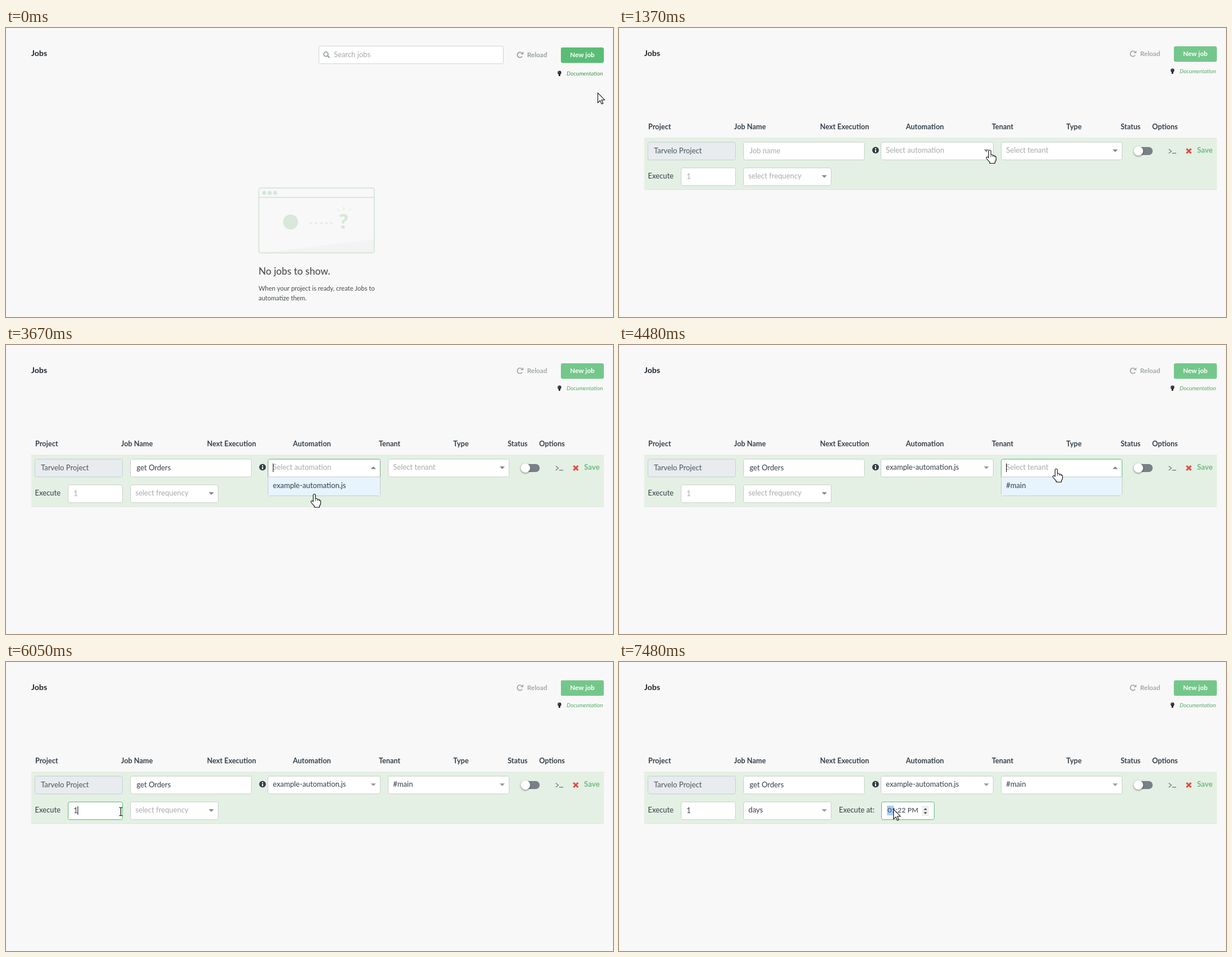
Recreate the animation shown at these times as an HTML page with a canvas. Size 1060 px wide and 505 px high, loop 8000 ms.

```html
<!DOCTYPE html>
<html lang="en">
<head>
<meta charset="utf-8">
<title>Jobs</title>
<style>
  html, body { margin: 0; width: 100%; height: 100%; overflow: hidden; background: #f8f8f8; }
  canvas { display: block; width: 1060px; height: 505px; }
</style>
</head>
<body>
<canvas id="stage" width="1060" height="505"></canvas>
<script>
const ctx = document.getElementById('stage').getContext('2d');
const LOOP = 8000;
const FONT = 'Lato, "Open Sans", sans-serif';
const INK = '#333d47', MUTED = '#a6aaa7', GREEN = '#5bbd75', PALE = '#d7e7d9', LINE = '#c9d0cd';

// Bursts of activity: first update, last update, number of updates
const BURSTS = [
  [0, 0, 1], [70, 200, 3], [830, 1620, 11], [1710, 1710, 1], [1950, 2140, 4],
  [2320, 2320, 1], [2480, 2480, 1], [2720, 2780, 2], [2950, 3670, 10],
  [3900, 4700, 11], [4790, 4850, 2], [5010, 5570, 8], [5710, 6500, 12],
  [6580, 6760, 3], [6970, 7480, 8]
];

// Pointer path: time, x, y
const PATH = [
  [0, 1033, 113], [200, 1004, 45], [980, 1004, 45], [1383, 647, 213],
  [1620, 378, 212], [1710, 318, 208], [3110, 318, 208], [3430, 545, 215],
  [3510, 545, 218], [3670, 538, 260], [3900, 538, 260], [4380, 762, 214],
  [4540, 764, 218], [4700, 764, 232], [4850, 760, 239], [5010, 760, 239],
  [5330, 153, 241], [5570, 140, 260], [5854, 140, 260], [6213, 290, 262],
  [6284, 292, 264], [6500, 298, 328], [6760, 302, 347], [7040, 302, 347],
  [7410, 479, 257], [LOOP, 479, 257]
];

const TYPED = 'get Orders';
const KEYS = [2000, 2070, 2130, 2310, 2470, 2710, 2770, 2940, 3020, 3100];

const PROJECT = [50, 199, 154, 32], NAME = [217, 199, 212, 32], AUTO = [457, 199, 197, 32],
  TENANT = [667, 199, 212, 32], COUNT = [108, 244, 96, 32], FREQ = [217, 244, 154, 32],
  TIME = [458, 244, 93, 32], BUTTON = [969, 34, 75, 27];

const HAND = new Path2D('M-2 2Q-2 0 0 0Q2 0 2 2V8Q4 7 6 9.5Q8 8.5 9 11Q11 10.5 11 13V17Q10.500 19 9 20.500V23H0V21Q-3 18 -6 14Q-6 11 -3 12L-2 13Z');
const ARROW = new Path2D('M0 0V17L4 13.300L6.700 19.300L9.200 18.200L6.600 12.300L12 12.200Z');

function snap(t) {
  const [a, b, n] = BURSTS.filter(s => s[0] <= t + 1).pop();
  if (n === 1) return a;
  const d = (b - a) / (n - 1);
  const i = Math.floor((t - a + 15) / d);
  return a + d * Math.min(n - 1, Math.max(0, i));
}

function pointer(t) {
  const i = Math.max(1, PATH.findIndex(p => p[0] >= t));
  const [t0, x0, y0] = PATH[i - 1], [t1, x1, y1] = PATH[i];
  const k = (t - t0) / (t1 - t0);
  return [x0 + (x1 - x0) * k, y0 + (y1 - y0) * k];
}

const during = (t, a, b) => t >= a && t < b;
const inside = ([px, py], [x, y, w, h]) => px >= x && px <= x + w && py >= y && py <= y + h;

function text(s, x, y, color = INK, size = 12.8, style = '') {
  ctx.font = `${style} ${size}px ${FONT}`;
  ctx.fillStyle = color;
  ctx.fillText(s, x, y);
}

const bold = (s, x, y, color = INK, size = 12.5) => text(s, x, y, color, size, 'bold');

function rect(x, y, w, h, color) {
  ctx.fillStyle = color;
  ctx.fillRect(x, y, w, h);
}

function dot(x, y, r, color) {
  ctx.fillStyle = color;
  ctx.beginPath();
  ctx.arc(x, y, r, 0, Math.PI * 2);
  ctx.fill();
}

function poly(points, color, fill, width = 1) {
  ctx.beginPath();
  points.forEach(p => ctx.lineTo(...p));
  if (fill) {
    ctx.fillStyle = color;
    ctx.fill();
  } else {
    ctx.strokeStyle = color;
    ctx.lineWidth = width;
    ctx.stroke();
  }
}

function box([x, y, w, h], border = LINE, fill = '#fff', radii = 3) {
  ctx.beginPath();
  ctx.roundRect(x + 0.5, y + 0.5, w - 1, h - 1, radii);
  ctx.fillStyle = fill;
  ctx.fill();
  ctx.strokeStyle = border;
  ctx.lineWidth = 1;
  ctx.stroke();
}

function triangle(x, y, half, up, color) {
  const h = up ? -half : half;
  poly([[x - half, y - h / 2], [x + half, y - h / 2], [x, y + h / 2]], color, true);
}

const caret = (x, y) => rect(x, y, 1, 15, '#111');

function select(area, label, { value, open, focus, blink = true, border = GREEN }) {
  const [x, y, w, h] = area;
  if (focus) {
    ctx.fillStyle = 'rgba(0,126,255,.12)';
    ctx.beginPath();
    ctx.roundRect(x - 2, y - 2, w + 4, h + 4, 5);
    ctx.fill();
  }
  box(area, open || focus ? border : LINE, '#fff', open ? [3, 3, 0, 0] : 3);
  text(value || label, x + 9, y + 19, value ? INK : MUTED);
  triangle(x + w - 12.5, y + 15.5, 4.5, open, value ? '#999' : '#808582');
  if (open && blink) caret(x + 9, y + 8);
}

function menu([x, y, w, h], items, active) {
  const top = y + h, rows = items.length;
  box([x, top - 1, w, rows * 32 + 2], '#c5cbc8', '#fff', [0, 0, 3, 3]);
  items.forEach((item, i) => {
    if (i === active) rect(x + 1, top + i * 32, w - 2, 32, '#e8f4fd');
    text(item, x + 9, top + 19 + i * 32);
  });
}

function header(t, form) {
  const dy = form ? -2 : 0;
  const gray = form ? '#a2a9a5' : '#959f9b';
  bold('Jobs', 44, 49, '#20262c', 14);

  ctx.strokeStyle = gray;
  ctx.lineWidth = 1.8;
  ctx.beginPath();
  ctx.arc(897.5, 47 + dy, 4.6, 0.6, 5.4);
  ctx.stroke();
  poly([[903.5, 41 + dy], [903.5, 46 + dy], [898.5, 46 + dy]], gray, true);
  bold('Reload', 910, 51 + dy, gray, 11.5);

  const hover = during(t, 130, 900);
  ctx.fillStyle = form ? '#74c78a' : hover ? '#4bad67' : GREEN;
  ctx.beginPath();
  ctx.roundRect(BUTTON[0], BUTTON[1] + dy, BUTTON[2], BUTTON[3], 3);
  ctx.fill();
  bold('New job', 985, 51 + dy, '#fff', 11.5);

  const by = form ? -4 : 0;
  dot(966.5, 78 + by, 3.2, '#2d3033');
  rect(965, 80 + by, 3, 4, '#2d3033');
  dot(965.6, 77 + by, 0.8, '#aaa');
  text('Documentation', 979, 83 + by, form ? '#56aa68' : '#46964f', 9.8, 'italic');
}

function emptyPage() {
  box([546, 31, 323, 32], '#cfd3d1');
  ctx.strokeStyle = '#94a09d';
  ctx.lineWidth = 1.8;
  ctx.beginPath();
  ctx.arc(558.7, 45.7, 3.8, 0, Math.PI * 2);
  ctx.stroke();
  poly([[561.5, 48.5], [565, 52]], '#94a09d', false, 2.2);
  text('Search jobs', 572.5, 51, '#a3aaa6');

  poly([[456, 392], [642, 369], [642, 392]], '#f2f3f2', true);
  ctx.strokeStyle = PALE;
  ctx.lineWidth = 2;
  ctx.beginPath();
  ctx.roundRect(441.5, 279.5, 201.5, 113.5, 4);
  ctx.stroke();
  poly([[442, 296], [642, 296]], PALE, false, 2);
  [451, 460.5, 470].forEach(x => dot(x, 288.2, 3.6, PALE));
  dot(497, 339, 13, PALE);
  for (let x = 530; x < 572; x += 9) rect(x, 340, 5, 1.5, PALE);
  text('?', 581, 351, PALE, 36, '900');
  poly([[578, 315], [582, 320]], PALE);
  poly([[590, 312], [590, 319]], PALE);
  poly([[602, 315], [598, 320]], PALE);

  text('No jobs to show.', 441, 431, '#4a4f52', 17, '500');
  text('When your project is ready, create Jobs to', 441, 459, '#45494c', 11);
  text('automatize them.', 441, 476, '#45494c', 11);
}

function rowIcons() {
  dot(448, 213.5, 5.8, '#343d46');
  rect(447, 210, 2, 2, '#fff');
  rect(447, 213, 2, 4, '#fff');

  ctx.fillStyle = '#798088';
  ctx.beginPath();
  ctx.roundRect(899, 208, 33, 14, 7);
  ctx.fill();
  ctx.save();
  ctx.shadowColor = 'rgba(0,0,0,.5)';
  ctx.shadowBlur = 3;
  ctx.shadowOffsetY = 1;
  dot(907, 215, 8.3, '#fff');
  ctx.restore();

  poly([[960, 211.5], [964.5, 215.3], [960, 219]], '#7c8589', false, 1.5);
  rect(966, 218, 7, 1.5, '#7c8589');
  poly([[991, 211], [999, 219]], '#df4b43', false, 3);
  poly([[999, 211], [991, 219]], '#df4b43', false, 3);
  bold('Save', 1009.5, 218, '#70ba80', 13);
}

function timeField(t) {
  const focus = t >= 7400;
  text('Execute at:', 384, 263);
  box(TIME, focus ? GREEN : LINE);
  if (focus) rect(468, 251, 12, 17, '#a9cff8');
  text('01:22 PM', 469, 263, INK, 12.3);
  if (focus) {
    rect(529, 251, 12, 18, '#efefef');
    triangle(535, 257, 3, true, '#333');
    triangle(535, 264, 3, false, '#333');
  }
}

function jobForm(t, pos, open) {
  const titles = { Project: 51, 'Job Name': 201, 'Next Execution': 351, Automation: 501,
    Tenant: 651, Type: 781, Status: 876, Options: 931 };
  for (const s in titles) bold(s, titles[s], 177, '#36414b');

  rect(44, 192, 1000, 91, '#e4f0e4');
  rect(44, 192, 1000, 1, '#dfe7df');
  rect(44, 282, 1000, 1, '#dfe7df');

  box(PROJECT, '#c6cfd1', '#e8ecef');
  text('Tarvelo Project', 61, 219, '#48535c');

  const typed = TYPED.slice(0, KEYS.filter(k => k <= t).length);
  const naming = during(t, 1940, 3420);
  box(NAME, naming ? GREEN : LINE);
  text(typed || 'Job name', 228, 219, typed ? INK : MUTED);
  if (naming) caret(Math.round(228 + (typed ? ctx.measureText(typed).width : 0)), 207);

  rowIcons();
  select(AUTO, 'Select automation', {
    value: t >= 3900 && 'example-automation.js',
    open: open.auto,
    focus: during(t, 3900, 4450),
    border: open.auto ? '#8b9c8f' : GREEN
  });
  select(TENANT, 'Select tenant', {
    value: t >= 5010 && '#main',
    open: open.tenant,
    focus: during(t, 5010, 5700),
    blink: t < 4840
  });

  text('Execute', 50.5, 263);
  const counting = during(t, 5700, 6280);
  box(COUNT, counting ? GREEN : LINE);
  text('1', 118, 264, t >= 5850 ? INK : MUTED);
  if (counting) caret(t >= 5850 ? 125 : 118, 252);

  select(FREQ, 'select frequency', {
    value: t >= 6970 && 'days',
    open: open.freq,
    focus: during(t, 6970, 7400),
    blink: t < 6660
  });
  if (t >= 7030) timeField(t);

  if (open.auto) menu(AUTO, ['example-automation.js'], 0);
  if (open.tenant) menu(TENANT, ['#main'], 0);
  if (open.freq) {
    const row = Math.floor((pos[1] - 276) / 32);
    menu(FREQ, ['minutes', 'hours', 'days'], Math.min(2, Math.max(0, row)));
  }
}

function drawPointer(pos, form, open) {
  const below = ([x, y, w, h], rows) => [x, y + h, w, rows * 32];
  const clickable = form ? [AUTO, TENANT, FREQ] : [BUTTON];
  if (open.auto) clickable.push(below(AUTO, 1));
  if (open.tenant) clickable.push(below(TENANT, 1));
  if (open.freq) clickable.push(below(FREQ, 3));
  const over = area => inside(pos, area);

  ctx.save();
  ctx.translate(Math.round(pos[0]) + 0.5, Math.round(pos[1]) + 0.5);
  if (form && [NAME, COUNT].some(over)) {
    poly([[0, -7], [0, 7]], '#111', false, 1.2);
    poly([[-3, -7], [3, -7]], '#111');
    poly([[-3, 7], [3, 7]], '#111');
  } else {
    const shape = clickable.some(over) ? HAND : ARROW;
    ctx.fillStyle = '#fff';
    ctx.strokeStyle = '#111';
    ctx.lineWidth = 1.1;
    ctx.fill(shape);
    ctx.stroke(shape);
    if (shape === HAND) {
      [2, 5.5, 8.5].forEach(x => poly([[x, 9], [x, 12]], '#111', false, 0.8));
    }
  }
  ctx.restore();
}

function draw(time) {
  const t = snap(time);
  const pos = pointer(t);
  const form = t >= 900;
  const open = {
    auto: during(t, 3420, 3890),
    tenant: during(t, 4450, 5000),
    freq: during(t, 6280, 6960)
  };
  rect(0, 0, 1060, 505, '#f8f8f8');
  header(t, form);
  if (form) jobForm(t, pos, open);
  else emptyPage();
  drawPointer(pos, form, open);
}

const start = performance.now();
function tick() {
  draw((performance.now() - start) % LOOP);
  requestAnimationFrame(tick);
}
tick();
</script>
</body>
</html>
```
